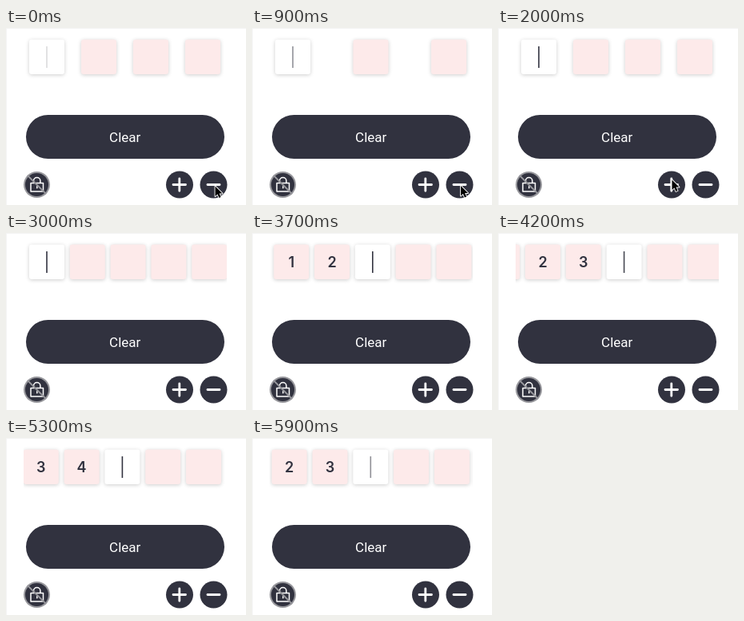
Write an HTML page with a canvas that moves like this. It is 300 px wide and 222 px high and loops after 6 s.

```html
<!DOCTYPE html>
<html lang="en">
<head>
<meta charset="utf-8">
<style>
  html, body { margin: 0; height: 100%; overflow: hidden; background: #fff; }
  canvas { display: block; }
</style>
</head>
<body>
<canvas id="stage" width="300" height="222"></canvas>
<script>
const ctx = document.getElementById('stage').getContext('2d');
const LOOP = 6000, STEP = 100;
const DARK = '#31323f', PINK = '#fdeaea';
const VIEW = { left: 22, right: 276 }, FIRST = 29, SIZE = 44, PITCH = 50.8;

// [time, value] steps
const counts = [[0, 4], [400, 3], [1000, 2], [1600, 3], [1900, 4], [2200, 5], [2450, 6], [2700, 7]];
const focuses = [[0, 0], [3300, 1], [3600, 2], [4000, 3], [4450, 4], [4950, 5], [5300, 4], [5600, 3]];
const caretResets = [-400, 1900, 2900, ...focuses.slice(1).map(f => f[0])];
// [time, x, y] of the pointer tip
const pointer = [[0, 261, 198], [800, 260.5, 197.5], [1250, 260.5, 197.5], [1550, 217, 190],
  [2800, 217, 190], [3000, 228, 226]];

const clamp = (v, lo, hi) => Math.min(hi, Math.max(lo, v));
const stepAt = (steps, t) => steps.filter(s => s[0] <= t).pop()[1];

function scrollFor(index) {
  const maxScroll = FIRST + 6 * PITCH + SIZE + 7 - VIEW.right;
  const center = FIRST + SIZE / 2 + index * PITCH;
  return clamp(center - (VIEW.left + VIEW.right) / 2, 0, maxScroll);
}

function scrollAt(t) {
  let pos = 0;
  focuses.forEach(([start, index], i) => {
    if (t < start) return;
    const end = Math.min(t, focuses[i + 1]?.[0] ?? LOOP);
    const p = clamp((end - start) / 340, 0, 1);
    pos += (scrollFor(index) - pos) * (1 - (1 - p) ** 2);
  });
  return pos;
}

function caretAlpha(t) {
  const since = t - caretResets.filter(r => r <= t).pop();
  return clamp(0.5 + 0.6 * Math.cos((since - 60) / 1000 * 2 * Math.PI), 0, 1);
}

function fillRound(x, y, w, h, r, color) {
  ctx.fillStyle = color;
  ctx.beginPath();
  ctx.roundRect(x, y, w, h, r);
  ctx.fill();
}

function stroke(path, color, width) {
  ctx.strokeStyle = color;
  ctx.lineWidth = width;
  ctx.lineCap = ctx.lineJoin = 'round';
  ctx.stroke(new Path2D(path));
}

function label(text, x, y, font, color) {
  ctx.font = font;
  ctx.fillStyle = color;
  ctx.textAlign = 'center';
  ctx.fillText(text, x, y);
}

function drawCells(t) {
  const count = stepAt(counts, t), focus = stepAt(focuses, t), scroll = scrollAt(t);
  const pitch = Math.max(PITCH, 195 / (count - 1));
  ctx.save();
  ctx.beginPath();
  ctx.rect(VIEW.left, 0, VIEW.right - VIEW.left, 80);
  ctx.clip();
  for (let i = 0; i < count; i++) {
    const x = FIRST + i * pitch - scroll, mid = x + SIZE / 2;
    ctx.save();
    ctx.shadowColor = 'rgba(0,0,0,.2)';
    ctx.shadowBlur = 5;
    ctx.shadowOffsetY = 1;
    fillRound(x, 14.5, SIZE, SIZE - 0.5, 3, i === focus ? '#fff' : PINK);
    ctx.restore();
    if (i < focus) label(i + 1, mid, 43, '600 18px Inter, sans-serif', DARK);
    if (i === focus) {
      ctx.globalAlpha = caretAlpha(t);
      fillRound(mid - 0.8, 23, 1.6, 27, 0, DARK);
      ctx.globalAlpha = 1;
    }
  }
  ctx.restore();
}

function drawControls() {
  fillRound(25, 109, 248, 55, 27.5, DARK);
  label('Clear', 148.7, 143, '17px Roboto, sans-serif', '#fff');
  fillRound(200, 179.5, 34, 34, 17, DARK);
  fillRound(242.5, 179.5, 34, 34, 17, DARK);
  stroke('M209 196.5h15.5M216.8 188.8v15.5', '#fff', 2.8);
  stroke('M252 196.5h15', '#fff', 2.8);

  fillRound(22, 180, 33, 33, 16.5, '#97979c');
  fillRound(24, 182, 29, 29, 14.5, DARK);
  stroke('M31 194.5h15.5v10.5h-15.5zM34.5 194v-2.3a4.2 4.2 0 0 1 8.4 0v2.3M38.8 198.8v2', '#fff', 1.5);
  stroke('M27.5 185.5L49.5 207.5', '#97979c', 1.8);
}

function drawPointer(t) {
  const next = pointer.findIndex(p => p[0] > t);
  if (next < 0) return;
  const [t0, x0, y0] = pointer[next - 1], [t1, x1, y1] = pointer[next];
  const p = (t - t0) / (t1 - t0), e = p * p * (3 - 2 * p);
  ctx.save();
  ctx.translate(x0 + (x1 - x0) * e, y0 + (y1 - y0) * e);
  const arrow = 'M.5 .5V13L3.4 10.4L5.4 15L7.6 14L5.6 9.6H9.5Z';
  stroke(arrow, '#fff', 1.8);
  ctx.fillStyle = '#000';
  ctx.fill(new Path2D(arrow));
  ctx.restore();
}

function draw(now) {
  const t = Math.floor(now % LOOP / STEP) * STEP;
  ctx.fillStyle = '#fff';
  ctx.fillRect(0, 0, 300, 222);
  ctx.fillStyle = '#f4f4f4';
  ctx.fillRect(0, 0, 300, 1);
  ctx.fillRect(0, 0, 1, 222);
  drawCells(t);
  drawControls();
  drawPointer(t);
}

const begin = performance.now();
(function tick() {
  draw(performance.now() - begin);
  requestAnimationFrame(tick);
})();
</script>
</body>
</html>
```
